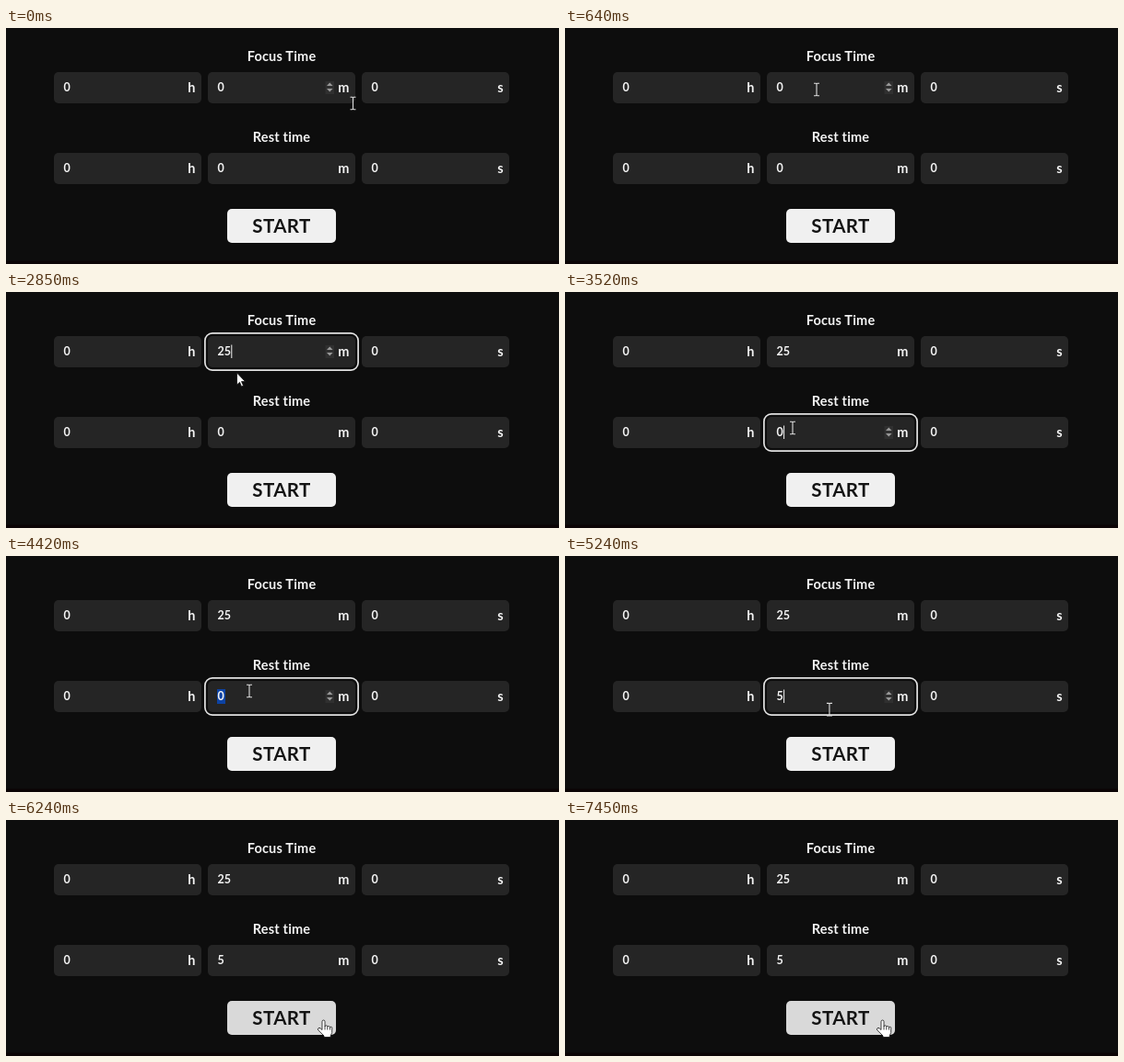
These frames come from a looping animation (600x257 px, 7550 ms). An HTML page:

```html
<!DOCTYPE html>
<html lang="en">
<head>
<meta charset="utf-8">
<title>Focus timer</title>
<style>
  html, body { margin: 0; width: 100%; height: 100%; overflow: hidden; background: #0d0d0d; }
  svg { display: block; width: 100%; height: 100%; font: bold 14.5px Lato, "Open Sans", sans-serif; fill: #f4f4f4; }
  .title { text-anchor: middle; letter-spacing: .2px; }
  .field { fill: #252525; }
  .value { font-size: 12.5px; }
  .unit { text-anchor: end; }
  .ring { fill: none; stroke: #e2e2e2; stroke-width: 1.7; }
  .selection { fill: #0d43a4; }
  .start { font-size: 20.5px; letter-spacing: .4px; text-anchor: middle; fill: #141414; }
  .ibeam { fill: none; stroke: #dedede; stroke-width: 1.1; }
  .solid { fill: #fff; stroke: #111; stroke-width: .8; stroke-linejoin: round; }
</style>
</head>
<body>
<svg id="stage" viewBox="0 0 600 257">
  <rect y="253.5" width="600" height="3.5" fill="#0b0405"/>
  <text class="title" x="299" y="36">Focus Time</text>
  <text class="title" x="299" y="124">Rest time</text>
  <g id="rows"></g>
  <rect id="button" x="240" y="197" width="118" height="37" rx="5"/>
  <text class="start" x="299" y="223">START</text>
  <g id="cursor">
    <path id="arrow" class="solid" d="M0 0V13l3-2.8 2 4.6 2-.9-2-4.5h4z"/>
    <path id="ibeam" class="ibeam" d="M-3-6.8h2.2l.8.7.8-.7H3M-3 6.8h2.2l.8-.7.8.7H3M0-6V6"/>
    <g id="hand" class="solid">
      <path d="M-1.5 10V1a1.5 1.5 0 0 1 3 0v5.5a1.4 1.4 0 0 1 2.8.4 1.4 1.4 0 0 1 2.7.5 1.2 1.2 0 0 1 2.2 1V13l-1.5 3.5V18H.5v-1.5L-5.6 10.5a1.5 1.5 0 0 1 2.2-2.2z"/>
      <path d="M1.5 6.5V10M4.3 7v3M7 7.5V10" fill="none"/>
    </g>
  </g>
</svg>
<script>
const LOOP = 7550, BLINK = 530;
const COLUMNS = [52, 219, 386], ROWS = [48, 136], MINUTES = COLUMNS[1];
const FIELD = { w: 160, h: 34 };
const $ = id => document.getElementById(id);

// Cursor hot spot: [ms, x, y]
const PATH = [
  [30, 376.5, 82], [640, 273, 67], [730, 272.5, 67], [1330, 272.5, 67], [1590, 220, 65],
  [2700, 250, 66], [2730, 250, 66], [3090, 252, 150], [3360, 252, 150], [3520, 247, 148],
  [3670, 244, 148], [3850, 244, 148], [4060, 231, 148], [4410, 264, 147], [5030, 264, 147],
  [5640, 347, 220], [5670, 347, 219.5], [5780, 344.5, 218.5]
];

// What happens in each minutes field
const INPUTS = [
  { focus: 880, blur: 3360, select: 1500, typed: [[2390, "2"], [2550, "25"]] },
  { focus: 3360, blur: 6240, select: 4010, typed: [[4730, "5"]] }
];

const fieldMarkup = (x, y, unit) => `
  <rect class="field" x="${x}" y="${y}" width="${FIELD.w}" height="${FIELD.h}" rx="5"/>
  <text class="unit" x="${x + 153.5}" y="${y + 22}">${unit}</text>`;
const valueMarkup = (x, y) => `<text class="value" x="${x + 10.5}" y="${y + 21.3}">0</text>`;
const minutesMarkup = y => `
  <rect class="ring" x="215.9" y="${y - 3.1}" width="166.2" height="40.2" rx="8"/>
  <rect class="selection" x="229" y="${y + 9}" width="9" height="16"/>
  <g class="spinner">
    <rect x="346.5" y="${y + 10}" width="9.5" height="14" fill="#303030"/>
    <path d="M348 ${y + 15}l3.3-3.5 3.3 3.5zM348 ${y + 18}l3.3 3.5 3.3-3.5z" fill="#999"/>
  </g>
  <rect class="caret" y="${y + 9.5}" width="1" height="14.5"/>`;

$("rows").innerHTML = ROWS.map(y =>
  COLUMNS.map((x, i) => fieldMarkup(x, y, "hms"[i])).join("") +
  `<g class="minutes">${minutesMarkup(y)}${valueMarkup(MINUTES, y)}</g>` +
  valueMarkup(COLUMNS[0], y) + valueMarkup(COLUMNS[2], y)).join("");

const inputs = [...document.querySelectorAll(".minutes")].map((group, i) => {
  const part = name => group.querySelector("." + name);
  return { ...INPUTS[i], y: ROWS[i], ring: part("ring"), selection: part("selection"),
    spinner: part("spinner"), caret: part("caret"), value: part("value") };
});

const clamp = v => Math.min(1, Math.max(0, v));
const smooth = v => v * v * (3 - 2 * v);
const show = (el, on) => el.setAttribute("visibility", on ? "visible" : "hidden");
const inside = (p, x, y, w, h) => p.x >= x && p.x <= x + w && p.y >= y && p.y <= y + h;

function cursorAt(t) {
  const next = PATH.findIndex(p => p[0] > t);
  const b = PATH.at(next), a = next > 0 ? PATH[next - 1] : b;
  const k = a === b ? 0 : smooth((t - a[0]) / (b[0] - a[0]));
  return { x: a[1] + (b[1] - a[1]) * k, y: a[2] + (b[2] - a[2]) * k };
}

function drawInput(input, t, cursor, cursorShown) {
  const focused = t >= input.focus && t < input.blur;
  const typed = input.typed.filter(([at]) => t >= at).pop();
  const selected = focused && !typed && t >= input.select;
  const text = typed ? typed[1] : "0";
  const since = t - (typed ? typed[0] : input.focus);
  const hovered = cursorShown && inside(cursor, MINUTES, input.y, FIELD.w, FIELD.h);

  input.value.textContent = text;
  input.ring.setAttribute("opacity", focused ? clamp((t - input.focus + 30) / 150) : 0);
  show(input.selection, selected);
  show(input.spinner, focused || hovered);
  show(input.caret, focused && !selected && since % (2 * BLINK) < BLINK);
  input.caret.setAttribute("x", 229.9 + 7.2 * text.length);
}

function drawCursor(cursor, shown) {
  const overField = ROWS.some(y => COLUMNS.some(x => inside(cursor, x, y, FIELD.w, FIELD.h)));
  const overButton = inside(cursor, 240, 197, 118, 37);
  const shape = overField ? "ibeam" : overButton ? "hand" : "arrow";
  for (const id of ["arrow", "ibeam", "hand"]) show($(id), shown && id === shape);
  $("cursor").setAttribute("transform", `translate(${cursor.x} ${cursor.y})`);
}

function frame() {
  const t = performance.now() % LOOP;
  const cursor = cursorAt(t);
  const cursorShown = t < 1640 || t >= 2730;
  const grey = Math.round(240 - 23 * smooth(clamp((t - 5600) / 180)));
  inputs.forEach(input => drawInput(input, t, cursor, cursorShown));
  drawCursor(cursor, cursorShown);
  $("button").setAttribute("fill", `rgb(${grey},${grey},${grey})`);
  requestAnimationFrame(frame);
}
frame();
</script>
</body>
</html>
```
